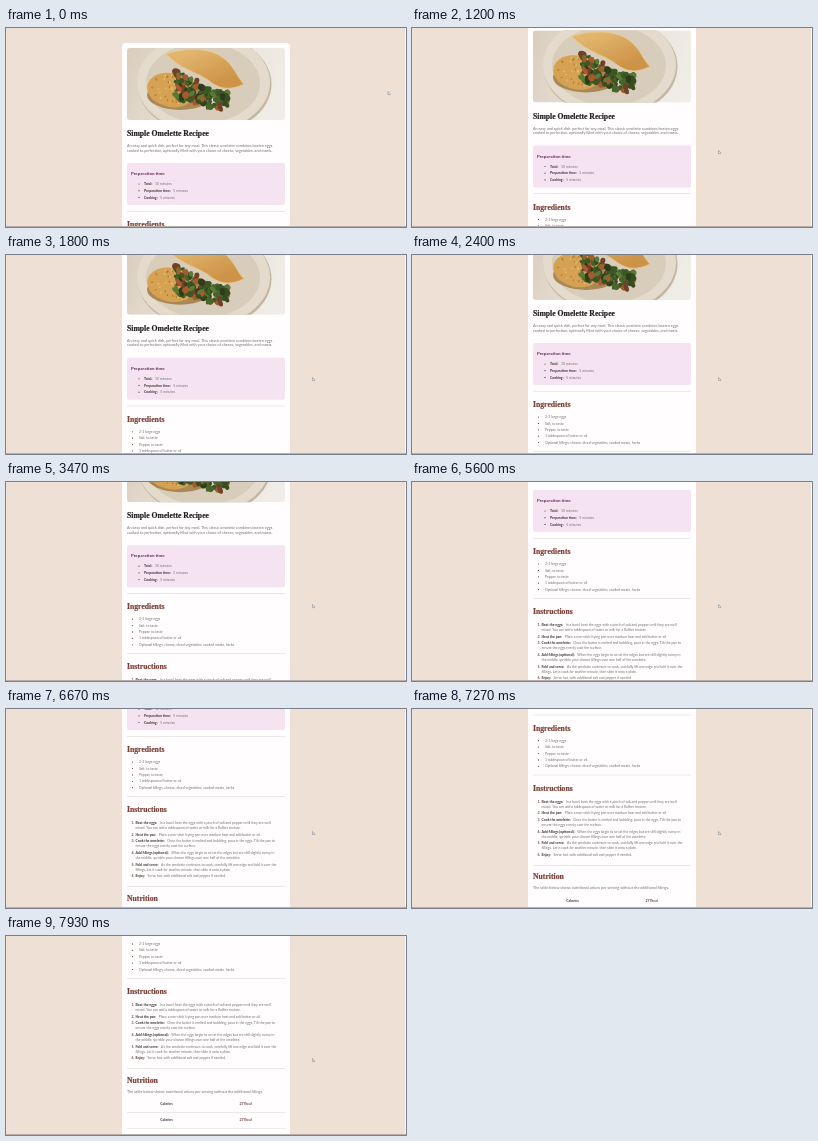
Write an HTML page with a canvas that moves like this. It is 400 px wide and 199 px high and loops after 8000 ms.

```html
<!DOCTYPE html>
<html lang="en">
<head>
<meta charset="utf-8">
<title>Recipe page</title>
<style>
  html, body { margin: 0; width: 100%; height: 100%; overflow: hidden; background: #eee0d5; }
  canvas { display: block; width: 400px; height: 199px; }
</style>
</head>
<body>
<canvas id="stage"></canvas>
<script>
const W = 400, H = 199, LOOP = 8000, STEP = 1000 / 15;
const SERIF = '"Liberation Serif", serif', SANS = 'Lato, sans-serif';
const INK = '#25201f', BROWN = '#7d4038', PLUM = '#642a55', GREY = '#77706e', BOLD = '#3b302f';

const canvas = document.getElementById('stage');
const ctx = canvas.getContext('2d');
const ratio = window.devicePixelRatio || 1;
canvas.width = W * ratio;
canvas.height = H * ratio;

// [time, scroll offset]
const scrollKeys = [[0, 0], [450, 0], [1200, 17.5], [2400, 47], [4330, 92],
  [5600, 127], [6670, 156], [7930, 201], [8000, 203]];

const ingredients = ['2-3 large eggs', 'Salt, to taste', 'Pepper, to taste',
  '1 tablespoon of butter or oil',
  'Optional fillings: cheese, diced vegetables, cooked meats, herbs'];

const steps = [
  [270, 'Beat the eggs:', 'In a bowl, beat the eggs with a pinch of salt and pepper until they are well',
    'mixed. You can add a tablespoon of water or milk for a fluffier texture.'],
  [281.5, 'Heat the pan:', 'Place a non-stick frying pan over medium heat and add butter or oil.'],
  [288.3, 'Cook the omelette:', 'Once the butter is melted and bubbling, pour in the eggs. Tilt the pan to',
    'ensure the eggs evenly coat the surface.'],
  [300.2, 'Add fillings (optional):', 'When the eggs begin to set at the edges but are still slightly runny in',
    'the middle, sprinkle your chosen fillings over one half of the omelette.'],
  [311.7, 'Fold and serve:', 'As the omelette continues to cook, carefully lift one edge and fold it over the',
    'fillings. Let it cook for another minute, then slide it onto a plate.'],
  [323.3, 'Enjoy:', 'Serve hot, with additional salt and pepper if needed.']
];

function keyed(keys, t) {
  let i = 1;
  while (i < keys.length - 1 && t > keys[i][0]) i++;
  const [t0, a] = keys[i - 1], [t1, b] = keys[i];
  return a + (b - a) * Math.min(1, (t - t0) / (t1 - t0));
}

function text(str, x, y, color = GREY, font = `3.45px ${SANS}`, align = 'left') {
  ctx.font = font;
  ctx.fillStyle = color;
  ctx.textAlign = align;
  ctx.fillText(str, x, y);
  return x + ctx.measureText(str).width;
}

const bold = (str, x, y, color = BOLD, align) => text(str, x, y, color, `bold 3.45px ${SANS}`, align);
const paragraph = (str, y) => text(str, 121, y, GREY, `3.75px ${SANS}`);

function heading(str, y, color = BROWN) {
  text(str, 121, y, color, `bold 7.7px ${SERIF}`);
  ctx.strokeStyle = color;
  ctx.lineWidth = 0.2;
  ctx.strokeText(str, 121, y);
}

function box(x, y, w, h, r, color) {
  ctx.fillStyle = color;
  ctx.beginPath();
  ctx.roundRect(x, y, w, h, r);
  ctx.fill();
}

function oval(x, y, rx, ry, color, turn = 0) {
  ctx.fillStyle = color;
  ctx.beginPath();
  ctx.ellipse(x, y, rx, ry, turn, 0, Math.PI * 2);
  ctx.fill();
}

const rule = y => box(121, y, 158, 0.5, 0, '#ddd4d2');
const bullet = (x, y, color) => oval(x, y, 0.6, 0.6, color);

function seeded(seed) {
  return () => (seed = (seed * 16807) % 2147483647) / 2147483647;
}

function photo() {
  const rnd = seeded(41);
  ctx.save();
  ctx.beginPath();
  ctx.roundRect(121, 20, 158, 72, 3);
  ctx.clip();
  const table = ctx.createLinearGradient(121, 20, 279, 92);
  table.addColorStop(0, '#d9cdbd');
  table.addColorStop(0.5, '#e9e2d9');
  table.addColorStop(1, '#f1eee9');
  ctx.fillStyle = table;
  ctx.fillRect(121, 20, 158, 72);

  oval(198.5, 56, 67, 50, '#c3b6a3');
  oval(197.5, 54.5, 66.5, 49, '#e4dbcd');
  oval(197, 55, 57, 40, '#d8ccba');

  // lower flap
  oval(174, 67, 33, 15, '#a98856');
  oval(165, 62, 24, 17, '#d5a254', 0.2);
  for (let i = 0; i < 40; i++) {
    const a = rnd() * 6.3, r = Math.sqrt(rnd());
    oval(164 + 21 * r * Math.cos(a), 62 + 15 * r * Math.sin(a), 1.2, 0.7, i % 2 ? '#b97d36' : '#e3bb72', a);
  }

  // leaves and fillings
  const tones = ['#354d20', '#46652b', '#2c3d1b', '#5b7a35', '#3d5724', '#a45b2d', '#71402a'];
  for (let i = 0; i < 110; i++) {
    const u = rnd();
    const x = 169 + u * 52;
    const y = 42 + u * 24 + rnd() * (28 - u * 10);
    oval(x, y, 2 + rnd() * 3.2, 1.4 + rnd() * 2.2, tones[i % 7], rnd() * 3);
  }

  // upper fold
  const fold = ctx.createLinearGradient(190, 22, 205, 58);
  fold.addColorStop(0, '#e2b56d');
  fold.addColorStop(1, '#cd9449');
  ctx.fillStyle = fold;
  ctx.beginPath();
  ctx.moveTo(160, 26);
  ctx.bezierCurveTo(181, 19, 203, 20, 216, 29);
  ctx.bezierCurveTo(229, 38, 231, 50, 238, 56);
  ctx.bezierCurveTo(226, 62, 216, 62, 206, 55);
  ctx.bezierCurveTo(193, 44, 176, 43, 160, 26);
  ctx.fill();
  ctx.strokeStyle = '#ecc989';
  ctx.lineWidth = 0.8;
  ctx.stroke();
  ctx.restore();
}

function intro() {
  photo();
  heading('Simple Omelette Recipee', 108.3, INK);
  paragraph('An easy and quick dish, perfect for any meal. This classic omelette combines beaten eggs', 119.1);
  paragraph('cooked to perfection, optionally filled with your choice of cheese, vegetables, and meats.', 123.7);

  box(121, 135, 158, 42, 2, '#f6e3f1');
  text('Preparation time', 125, 147, PLUM, `bold 4.5px ${SANS}`);
  [['Total:', '10 minutes'], ['Preparation time:', '5 minutes'], ['Cooking:', '5 minutes']]
    .forEach(([label, value], i) => {
      const y = 156 + i * 6.7;
      bullet(133, y, PLUM);
      text(value, bold(label, 138, y + 1.2) + 2.6, y + 1.2);
    });
}

function recipe() {
  rule(183);
  heading('Ingredients', 199.1);
  ingredients.forEach((item, i) => {
    const y = 209 + i * 6.4;
    bullet(126.5, y, BROWN);
    text(item, 133, y + 1.1);
  });

  rule(243);
  heading('Instructions', 259.1);
  steps.forEach(([y, label, first, second], i) => {
    bold(`${i + 1}.`, 125.5, y + 1.1, BROWN);
    text(first, bold(label, 129.5, y + 1.1) + 2.6, y + 1.1);
    if (second) text(second, 129.5, y + 5.9);
  });
}

function nutrition() {
  rule(333.2);
  heading('Nutrition', 347.6);
  paragraph('The table below shows nutritional values per serving without the additional fillings.', 357.6);
  for (let y = 369; y < 410; y += 16) {
    bold('Calories', 160.5, y + 1, BOLD, 'center');
    bold('277kcal', 239.5, y + 1, '#6d3333', 'center');
    rule(y + 8.3);
  }
}

function pointer(t) {
  const p = Math.max(0, Math.min(1, (t - 60) / 640));
  const k = p * p * (3 - 2 * p);
  ctx.save();
  ctx.translate(382 - 75.5 * k, 63.5 + 59 * k);
  ctx.beginPath();
  ctx.moveTo(0, 0);
  ctx.lineTo(0, 3.2);
  ctx.lineTo(0.9, 2.5);
  ctx.lineTo(1.6, 3.6);
  ctx.lineTo(2.5, 2.3);
  ctx.closePath();
  ctx.fillStyle = '#f8f8f8';
  ctx.fill();
  ctx.strokeStyle = '#7f8b96';
  ctx.lineWidth = 0.6;
  ctx.stroke();
  ctx.restore();
}

function draw(now) {
  // the small offset absorbs times rounded to 10 ms
  const t = Math.floor((now % LOOP) / STEP + 0.1) * STEP;
  ctx.setTransform(ratio, 0, 0, ratio, 0, 0);
  ctx.fillStyle = '#eee0d5';
  ctx.fillRect(0, 0, W, H);

  ctx.save();
  ctx.translate(0, -keyed(scrollKeys, t));
  box(116, 15, 168, 460, 4, '#fffdfe');
  intro();
  recipe();
  nutrition();
  ctx.restore();

  // window edges
  box(W - 1, 0, 1, H, 0, '#fafafa');
  box(0, H - 1, W, 1, 0, '#b9aeaa');
  pointer(t);
}

const start = performance.now();
function tick() {
  draw(performance.now() - start);
  requestAnimationFrame(tick);
}
tick();
</script>
</body>
</html>
```
